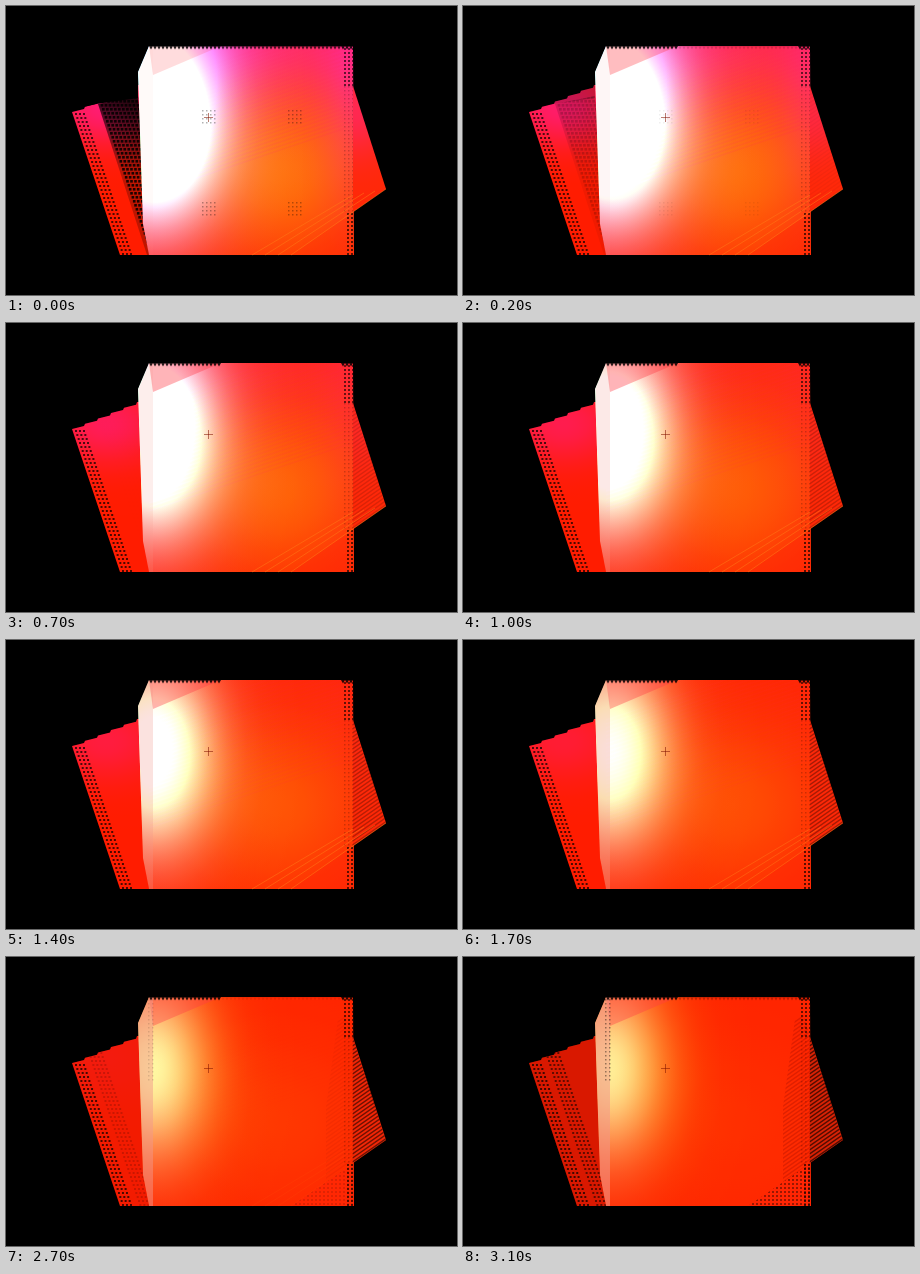
Recreate the animation shown at these times as an HTML page with a canvas. Size 451 by 289 pixels, loop 3200 ms.

```html
<!DOCTYPE html>
<html lang="en">
<head>
<meta charset="utf-8">
<title>Glowing sheets</title>
<style>
html, body { margin: 0; width: 100%; height: 100%; overflow: hidden; background: #000; }
canvas { display: block; }
</style>
</head>
<body>
<canvas width="451" height="289"></canvas>
<script>
const ctx = document.querySelector('canvas').getContext('2d');
const LOOP = 3200, STEP = 100, PITCH = 4;
const SLANT = 48 / 143;   // lean of the tilted sheet's sides
const RISE = -66 / 95;    // slope of its lower edge

const SHEET = [[143,40], [347,40], [348,249], [143,249], [137,218], [132,66]];
const FLAP = [[143,40], [147,40], [147,249], [143,249], [137,218], [132,66]];
const WEDGE = [[143,40], [215,40], [147,69]];
const CORNER = [[285,249], [348,206], [348,249]];
const RIGHT = [[347,80], [380,183], [347,206]];

const stairs = [];
for (let i = 0; i < 5; i++) {
  const x = 66 + 13 * i, y = 106 - 5.3 * i;
  stairs.push([x, y], [x + 12, y - 3]);
}
const LEFT = [...stairs, [131,79], [150,79], [150,249], [114,249]];

function fill(points, color) {
  trace(points);
  ctx.fillStyle = color;
  ctx.fill();
}

function trace(points) {
  ctx.beginPath();
  points.forEach(p => ctx.lineTo(...p));
  ctx.closePath();
}

function within(points, draw) {
  ctx.save();
  trace(points);
  ctx.clip();
  draw();
  ctx.restore();
}

// Adds light with a bell-shaped falloff; strong light saturates to a flat core.
function glow(x, y, rx, ry, green, blue) {
  const reach = 2.6, stops = 24;
  const light = ctx.createRadialGradient(0, 0, 0, 0, 0, reach);
  for (let i = 0; i <= stops; i++) {
    const r = reach * i / stops, fall = Math.exp(-r * r);
    const [g, b] = [green, blue].map(v => Math.min(255, Math.round(v * fall)));
    light.addColorStop(i / stops, `rgb(0,${g},${b})`);
  }
  ctx.save();
  ctx.globalCompositeOperation = 'lighter';
  ctx.translate(x, y);
  ctx.scale(rx, ry);
  ctx.fillStyle = light;
  ctx.fillRect(-reach, -reach, 2 * reach, 2 * reach);
  ctx.restore();
}

function mesh(x, y, w, h, slant, size, alpha) {
  ctx.fillStyle = `rgba(0,0,0,${alpha})`;
  for (let v = 0; v < h; v += PITCH)
    for (let u = 0; u < w; u += PITCH)
      ctx.fillRect(x + u + v * slant, y + v, size, size);
}

function hatch(x0, x1, y0, y1, slope, color) {
  ctx.strokeStyle = color;
  ctx.lineWidth = 1.5;
  ctx.beginPath();
  for (let y = y0; y < y1; y += PITCH) {
    ctx.moveTo(x0, y);
    ctx.lineTo(x1, y + (x1 - x0) * slope);
  }
  ctx.stroke();
}

function teeth(x0, x1, alpha) {
  for (let x = x0; x < x1; x += PITCH)
    fill([[x, 40], [x + PITCH, 40], [x + PITCH / 2, 43.5]], `rgba(0,0,0,${alpha})`);
}

function drawLeft({ heat, fresh, wear }) {
  within(LEFT, () => {
    ctx.fillStyle = '#ff1c00';
    ctx.fillRect(60, 70, 100, 180);
    glow(100, 100, 60, 40, 0, 115 * heat);
    mesh(69, 107, 12, 143, SLANT, 2, .7);
    mesh(81, 91, 14, 160, SLANT, 2, wear * .55);
    ctx.fillStyle = `rgba(0,0,0,${wear * .15})`;
    ctx.fillRect(60, 70, 100, 180);
    within([[92,98], [132,90], [145,249], [141,249]], () => {
      const shade = ctx.createLinearGradient(125, 95, 100, 160);
      shade.addColorStop(0, `rgba(0,0,0,${fresh * .85})`);
      shade.addColorStop(1, `rgba(0,0,0,${fresh * .25})`);
      ctx.fillStyle = shade;
      ctx.fillRect(80, 70, 70, 180);
      mesh(92, 90, 52, 160, SLANT, 2.6, fresh * .85);
    });
  });
  fill([[77,101], [90,98], [132,92], [132,77], [77,98]], `rgba(0,0,0,${fresh})`);
}

function drawSheet({ heat, fresh, wear }) {
  const flare = heat ** 1.7, tint = 110 * heat ** 4;
  within(SHEET, () => {
    ctx.fillStyle = '#ff2400';
    ctx.fillRect(130, 40, 220, 210);
    glow(270, 165, 90, 85, 10 + 68 * heat, 10 * heat);
    glow(240, 35, 150, 62, 0, tint);
    glow(350, 80, 34, 110, 0, tint * .7);
    hatch(143, 348, 80, 190, -SLANT, `rgba(255,40,90,${.12 * heat})`);
    glow(146, 112, 58, 88, 200 + 320 * flare, 0);
    glow(146, 112, 46 + 20 * heat, 85 + 18 * heat, 0, 150 + 390 * flare);
    fill(WEDGE, `rgba(255,60,70,${.38 - .2 * fresh})`);
    fill(FLAP, `rgba(240,150,140,${.55 - .5 * heat})`);
    fill(CORNER, `rgba(255,36,8,${.4 - .2 * fresh})`);

    mesh(338, 42, 11, 38, 0, 2, .6);
    mesh(338, 80, 11, 126, 0, 1.5, .2);
    mesh(341, 207, 8, 42, 0, 2, .65);
    within(CORNER, () => mesh(285, 206, 64, 44, 0, 2, wear * .4));
    mesh(142, 42, 5, 84, 0, 1.5, wear * .4);
    teeth(143, 215, .85);
    teeth(215, 335, .7 * fresh + .25 * wear);
    teeth(335, 348, .85);
  });
}

function drawRight({ heat, wear }) {
  within(RIGHT, () => {
    ctx.fillStyle = '#ff2806';
    ctx.fillRect(345, 78, 36, 130);
    glow(350, 105, 40, 45, 0, 75 * heat ** 4);
    hatch(345, 382, 86, 230, RISE, `rgba(0,0,0,${.62 * (1 - heat)})`);
    ctx.fillStyle = `rgba(0,0,0,${wear * .15})`;
    ctx.fillRect(345, 78, 36, 130);
  });
  within([[335,40], [347,80], [347,206], [320,225], [320,150]], () =>
    hatch(310, 350, 80, 260, RISE, `rgba(130,0,0,${wear * .25})`));

  ctx.strokeStyle = `rgba(255,125,25,${.5 * (1 - wear) * Math.min(1, heat * 2)})`;
  ctx.lineWidth = 1;
  for (let i = 0; i < 4; i++) {
    const x = 285 - 13 * i;
    ctx.beginPath();
    ctx.moveTo(x, 249);
    ctx.lineTo(380 - 11 * i, 183 + 2 * i);
    ctx.stroke();
  }
}

function drawMarks(fresh) {
  ctx.fillStyle = 'rgba(130,20,0,.55)';
  ctx.fillRect(198, 111, 9, 1);
  ctx.fillRect(202, 107, 1, 9);
  for (const x of [196, 282])
    for (const y of [104, 196]) mesh(x, y, 16, 14, 0, 1.5, fresh * .3);
}

function draw(t) {
  const look = {
    heat: 1 - t / (LOOP - STEP),
    fresh: Math.exp(-t / 130),
    wear: Math.max(0, (t - 2200) / 900) ** 2
  };
  ctx.fillStyle = '#000';
  ctx.fillRect(0, 0, 451, 289);
  drawLeft(look);
  drawSheet(look);
  drawRight(look);
  drawMarks(look.fresh);
}

const start = performance.now();
function tick() {
  const t = (performance.now() - start) % LOOP;
  draw(Math.floor(t / STEP) * STEP);
  requestAnimationFrame(tick);
}
tick();
</script>
</body>
</html>
```
